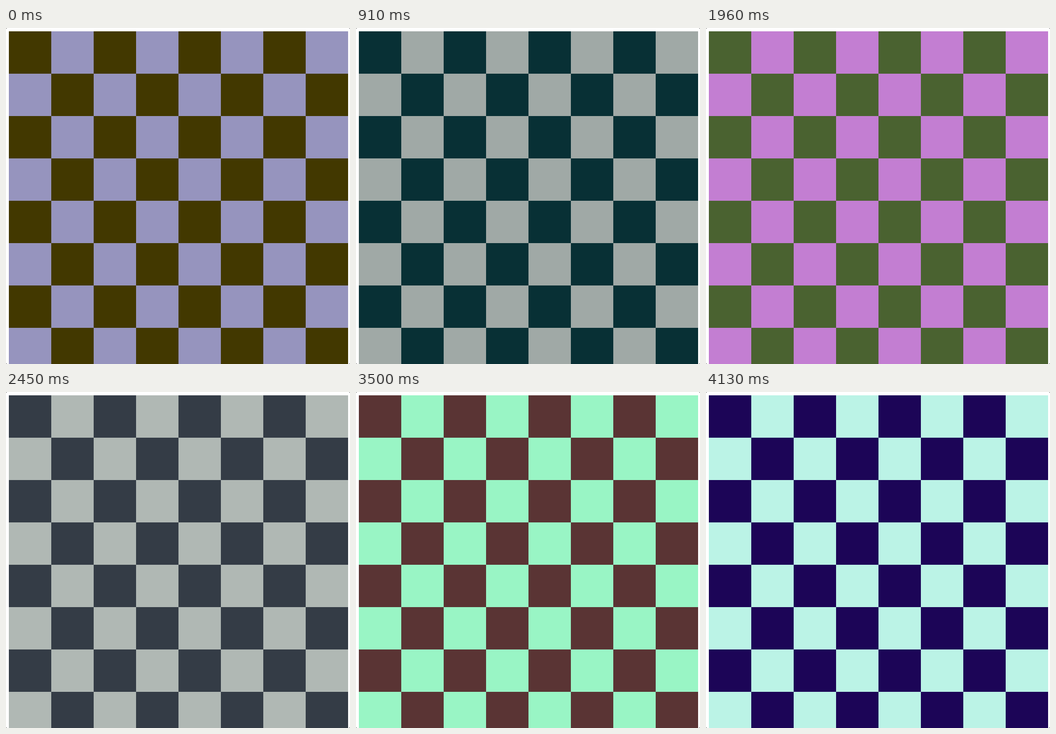
Recreate the animation shown at these times as an HTML page with a canvas. Size 722 by 706 pixels, loop 4.27 s.

```html
<!DOCTYPE html>
<html lang="en">
<head>
<meta charset="utf-8">
<title>Checkerboard</title>
<style>
  html, body { margin: 0; width: 100%; height: 100%; overflow: hidden; background: #fff; }
  canvas { display: block; }
</style>
</head>
<body>
<canvas id="board" width="722" height="706"></canvas>
<script>
const ctx = document.getElementById('board').getContext('2d');
const LOOP = 4270, CELL = 89, LEFT = 6, TOP = 7, BLEND = 70;

// start time, dark colour, light colour, whether it enters through a half blend
const themes = [
  [0, '#423800', '#9694be'],
  [280, '#3c3640', '#b4b4b8', true],
  [630, '#30403a', '#acb8b0', true],
  [910, '#083035', '#a0a9a6'],
  [1120, '#38304a', '#b8acc0'],
  [1400, '#232b55', '#a493e0'],
  [1680, '#3a4440', '#b4a4d0'],
  [1960, '#4a6230', '#c37ed2'],
  [2240, '#44403c', '#b8a8b8'],
  [2450, '#343c46', '#b0b8b4'],
  [2730, '#48383c', '#b4a8b4'],
  [3010, '#5c4043', '#b286ad'],
  [3290, '#443c40', '#a8bcb4'],
  [3500, '#5a3434', '#99f5c5'],
  [3780, '#40303c', '#a8c8bc'],
  [4060, '#1c0557', '#bbf3e6', true]
];

function mix(a, b) {
  const channel = (hex, i) => parseInt(hex.substr(1 + 2 * i, 2), 16);
  const rgb = [0, 1, 2].map(i => Math.round((channel(a, i) + channel(b, i)) / 2));
  return `rgb(${rgb})`;
}

function colorsAt(t) {
  let i = themes.length - 1;
  while (themes[i][0] > t) i--;
  const [start, dark, light, soft] = themes[i];
  if (soft && t < start + BLEND) {
    const before = themes[i - 1];
    return [mix(before[1], dark), mix(before[2], light)];
  }
  return [dark, light];
}

function draw(t) {
  const colors = colorsAt(t);
  ctx.fillStyle = '#555';
  ctx.fillRect(0, 0, 722, 706);
  ctx.fillStyle = '#fff';
  ctx.beginPath();
  ctx.roundRect(0, 0, 722, 706, 3);
  ctx.fill();
  for (let row = 0; row < 8; row++) {
    for (let col = 0; col < 8; col++) {
      ctx.fillStyle = colors[(row + col) % 2];
      ctx.fillRect(LEFT + col * CELL, TOP + row * CELL, CELL, CELL);
    }
  }
}

const begin = performance.now();
function tick(now) {
  draw(Math.max(0, now - begin) % LOOP);
  requestAnimationFrame(tick);
}
draw(0);
requestAnimationFrame(tick);
</script>
</body>
</html>
```
